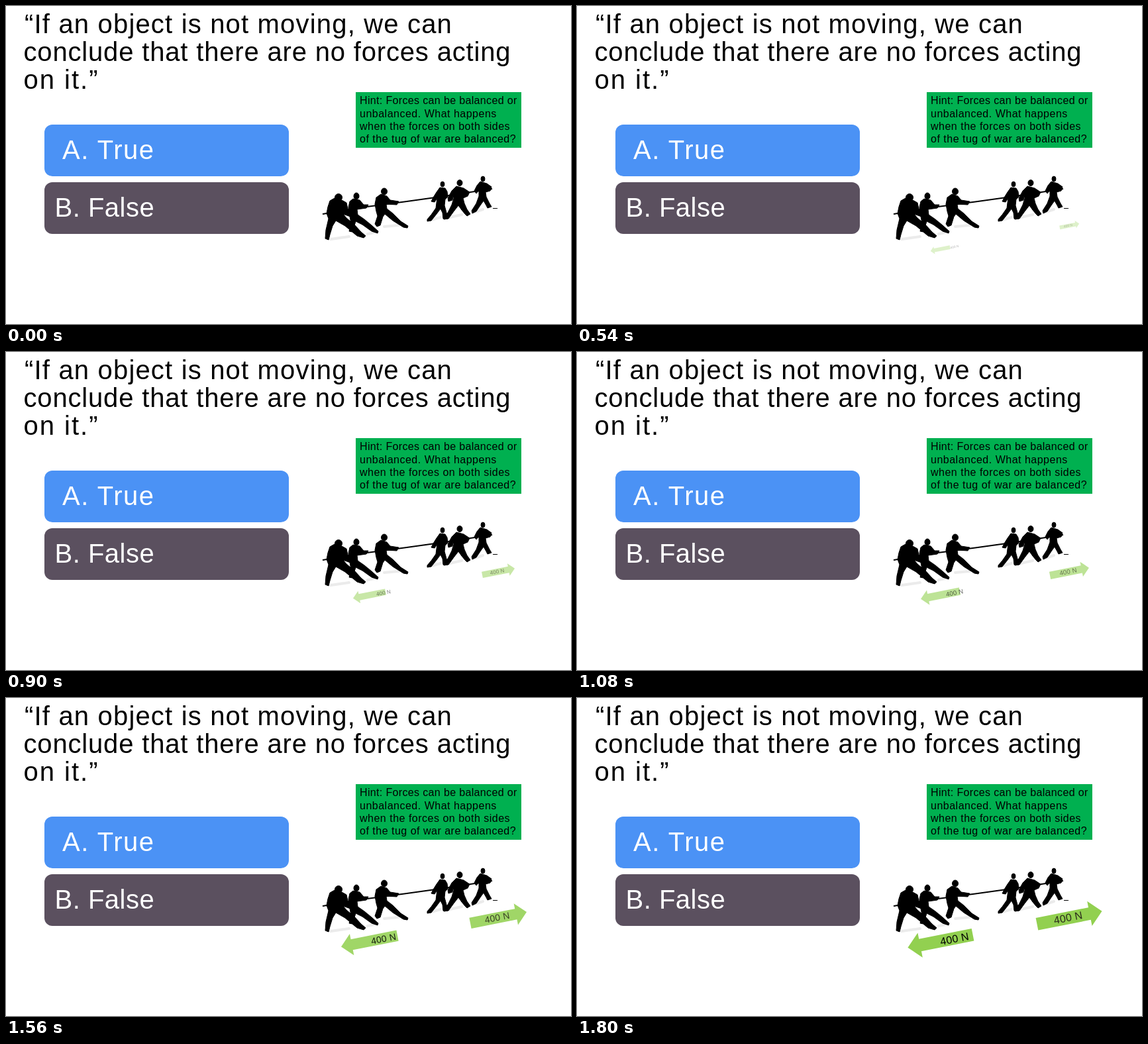
An HTML page that plays this animation: 853 by 480 pixels, repeating every 1.86 s.

```html
<!DOCTYPE html>
<html lang="en">
<head>
<meta charset="utf-8">
<title>Balanced forces</title>
<style>
  html, body { margin: 0; width: 100%; height: 100%; overflow: hidden; background: #fff; }
  svg { display: block; width: 853px; height: 480px; }
  text { font-family: "Liberation Sans", Arial, sans-serif; white-space: pre; }
  .title, .option { font-size: 40px; }
  .option { fill: #fff; }
  .hint { font-size: 16px; letter-spacing: .5px; }
  .people { stroke: #000; stroke-linejoin: round; }
  .shadow { stroke: #ebebeb; stroke-width: 4; stroke-linecap: round; }
  .force text { font-size: 16px; letter-spacing: .3px; text-anchor: middle; }
  .force path { fill: #92d050; }
</style>
</head>
<body>
<svg viewBox="0 0 853 480">
  <g class="title">
    <text x="28" y="41" letter-spacing="1.18">“If an object is not moving, we can</text>
    <text x="26.5" y="83" letter-spacing=".83">conclude that there are no forces acting</text>
    <text x="26.5" y="125" letter-spacing="2">on it.”</text>
  </g>

  <rect x="58" y="179" width="369" height="78" rx="12" fill="#4b92f5"/>
  <rect x="58" y="266" width="369" height="78" rx="12" fill="#5b505f"/>
  <g class="option">
    <text x="85" y="231" letter-spacing="1.5">A. True</text>
    <text x="73.5" y="318" letter-spacing=".5">B. False</text>
  </g>

  <rect x="528" y="130" width="250" height="84" fill="#00b050"/>
  <g class="hint">
    <text x="534" y="148" letter-spacing=".35" style="letter-spacing:.35px">Hint: Forces can be balanced or</text>
    <text x="534" y="168">unbalanced. What happens</text>
    <text x="534" y="187">when the forces on both sides</text>
    <text x="534" y="206">of the tug of war are balanced?</text>
  </g>

  <path class="shadow" d="M490 352L518 348M546 344L556 342M571 333L592 331M642 323L656 319M670 319L688 315M708 311L720 307"/>
  <g class="people">
    <path d="M478 314L545 303 605 295 648 289 734 276" fill="none" stroke-width="2"/>
    <ellipse cx="502" cy="289" rx="5.5" ry="5.5"/>
    <path d="M496 290L489 294 486 303 484 313 487 321 483 338 482 351 487 353 489 345 493 332 498 324 512 332 530 347 540 350 543 347 536 341 526 330 514 320 509 314 520 318 523 311 516 306 514 297 507 293Z"/>
    <ellipse cx="529" cy="287" rx="4" ry="5"/>
    <path d="M524 291L519 295 517 304 519 318 521 328 518 340 523 341 528 325 538 330 552 340 561 343 562 340 552 331 541 322 531 315 530 307 544 305 547 300 540 300 534 293Z"/>
    <ellipse cx="571" cy="280" rx="4.5" ry="5"/>
    <path d="M566 284L559 289 557 299 559 310 561 317 557 329 560 333 565 331 569 318 572 314 584 324 600 334 606 335 607 332 596 325 584 313 575 306 574 299 590 300 593 295 580 293 575 287Z"/>
    <ellipse cx="659" cy="269" rx="3" ry="4"/>
    <path d="M655 274L650 281 645 289 642 295 647 296 651 290 650 297 649 305 642 315 636 322 636 325 642 324 650 314 656 306 659 312 660 321 667 321 665 312 662 301 663 292 667 288 666 280 663 275Z"/>
    <ellipse cx="685" cy="267" rx="4" ry="4.5"/>
    <path d="M680 272L673 279 667 290 668 295 674 293 675 287 676 290 673 300 667 312 660 318 661 322 668 321 676 310 683 301 688 308 693 314 696 317 701 314 696 307 692 298 690 290 697 287 700 281 691 275Z"/>
    <ellipse cx="720" cy="261" rx="3" ry="4"/>
    <path d="M716 265L711 271 707 279 710 283 714 278 714 287 710 298 703 309 704 313 710 310 716 301 721 294 725 301 727 305 733 303 730 298 725 288 724 281 731 279 733 273 726 268Z"/>
    <path d="M735 305.5H742"/>
  </g>

  <g class="force">
    <g data-at="548.5 367" data-turn="168.8"><path d="M-50-9.5H31V-19L50 0 31 19V9.5H-50Z"/></g>
    <g data-at="743.5 331.5" data-turn="-11.2"><path d="M-50-9.5H31V-19L50 0 31 19V9.5H-50Z"/></g>
    <g data-at="570 363.5" data-turn="-11.2"><text y="5.5">400 N</text></g>
    <g data-at="741.5 331.5" data-turn="-11.2"><text y="5.5" fill="#2b2b1c">400 N</text></g>
  </g>
</svg>
<script>
  const LOOP = 1860, STEP = 60, HOLD = 180, GROW = 1800;
  const force = document.querySelector(".force");
  const parts = [...force.children];

  // Arrows and labels each grow about their own centre while fading in.
  function draw(now) {
    const time = now % LOOP;
    const size = time < HOLD ? 0 : Math.floor(time / STEP) * STEP / GROW;
    force.setAttribute("visibility", size ? "visible" : "hidden");
    for (const part of parts) {
      const { at, turn } = part.dataset;
      part.setAttribute("transform", `translate(${at}) rotate(${turn}) scale(${size})`);
      part.setAttribute("opacity", size);
    }
  }

  const start = performance.now();
  function tick() {
    draw(performance.now() - start);
    requestAnimationFrame(tick);
  }
  tick();
</script>
</body>
</html>
```
